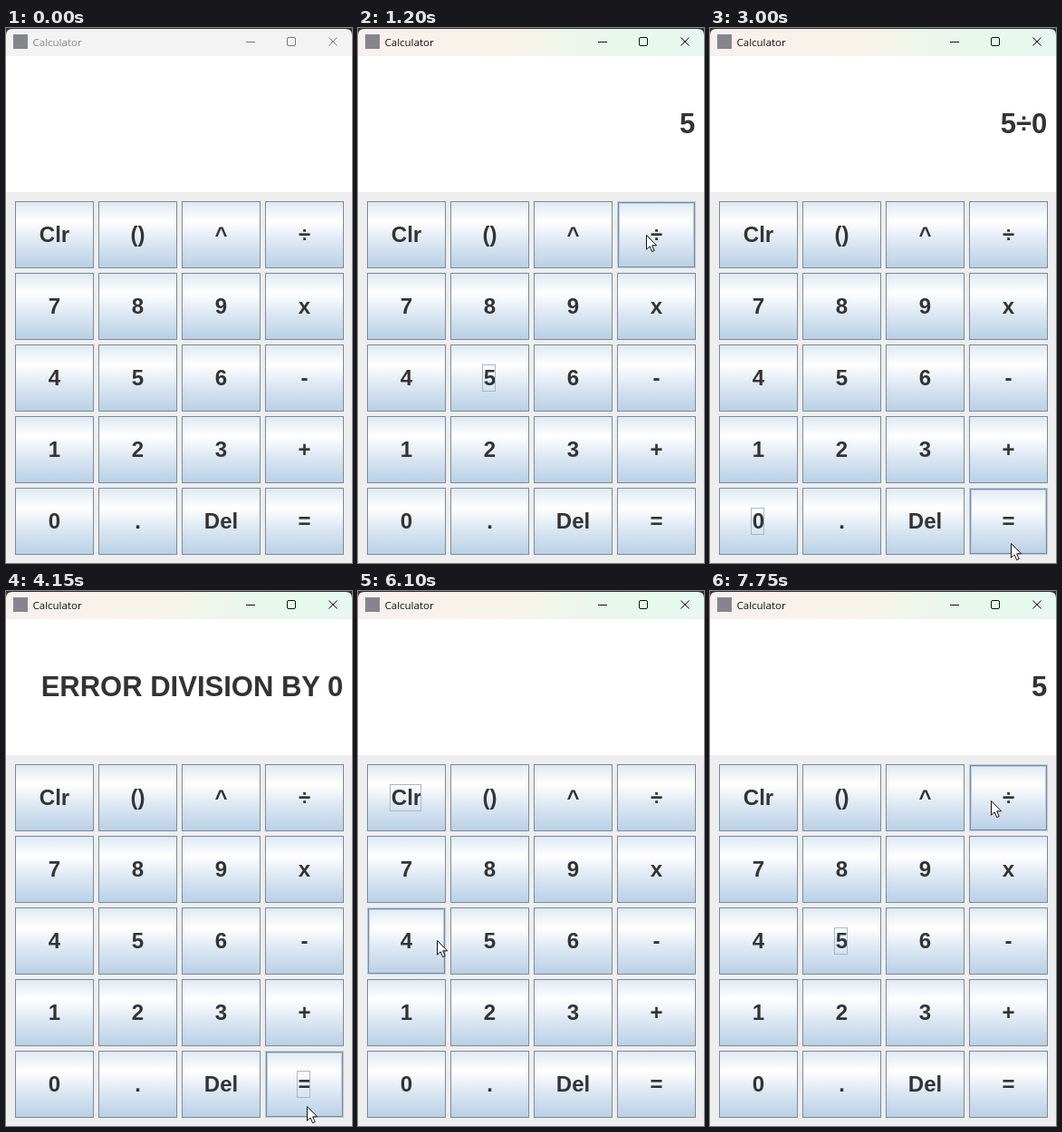
Animation of 382 by 590 pixels, one loop 8000 ms. Source, as an HTML page:

```html
<!DOCTYPE html>
<html lang="en">
<head>
<meta charset="utf-8">
<title>Calculator</title>
<style>
  html, body { margin: 0; width: 100%; height: 100%; overflow: hidden; background: #eee; }
  svg { display: block; }
  text { font-family: "Liberation Sans", Arial, sans-serif; font-weight: bold; fill: #333; }
  .key { font-size: 24px; text-anchor: middle; }
  #display { font-size: 31px; text-anchor: end; }
  #title { font: 11.5px "Open Sans", sans-serif; }
  .line { fill: none; stroke-width: 1; }
</style>
</head>
<body>
<svg id="stage" width="382" height="590" viewBox="0 0 382 590">
  <defs>
    <linearGradient id="face" x2="0" y2="1">
      <stop offset="0" stop-color="#dde8f3"/>
      <stop offset=".3" stop-color="#fff"/>
      <stop offset=".6" stop-color="#dde8f3"/>
      <stop offset="1" stop-color="#b8cfe5"/>
    </linearGradient>
    <linearGradient id="active">
      <stop offset="0" stop-color="#f8f0ee"/>
      <stop offset=".4" stop-color="#f9f2e8"/>
      <stop offset=".75" stop-color="#e8f8ec"/>
      <stop offset="1" stop-color="#e6f8f0"/>
    </linearGradient>
  </defs>
  <rect width="382" height="31" fill="#333"/>
  <path id="bar" d="M0 31V8Q0 1 7 1H375Q382 1 382 8V31Z"/>
  <rect x="8" y="7" width="16" height="16" fill="#85858f"/>
  <text id="title" x="29.5" y="20">Calculator</text>
  <g id="controls" class="line">
    <path d="M265 15.5h10"/>
    <rect x="310.5" y="10.5" width="9" height="9" rx="1.5"/>
    <path d="M356.5 10.5l9 9m0-9l-9 9"/>
  </g>
  <rect y="31" width="382" height="150" fill="#fff"/>
  <text id="display" x="372.3" y="116"></text>
  <g id="keys"></g>
  <path id="cursor" d="M.5 .5V16.2L4.1 12.8L6.6 18.6L9.2 17.5L6.7 11.8H11.6Z" fill="#fff" stroke="#111"/>
</svg>
<script>
const LOOP = 8000, HOLD = 100, W = 87, H = 74;
const $ = id => document.getElementById(id);

function add(parent, tag, attrs) {
  const el = document.createElementNS("http://www.w3.org/2000/svg", tag);
  for (const name in attrs) el.setAttribute(name, attrs[name]);
  parent.appendChild(el);
  return el;
}

const frame = (g, x, y, inset, color) => add(g, "rect", {
  x: x + inset + .5, y: y + inset + .5,
  width: W - 1 - 2 * inset, height: H - 1 - 2 * inset, class: "line", stroke: color
});

const keys = "Clr () ^ ÷ 7 8 9 x 4 5 6 - 1 2 3 + 0 . Del =".split(" ").map((label, i) => {
  const x = 10 + 92 * (i % 4), y = 191 + 79 * Math.floor(i / 4), mid = x + W / 2;
  const g = add($("keys"), "g", {});
  const face = add(g, "rect", { x, y, width: W, height: H });
  const edge = frame(g, x, y, 0, "#7a8a99");
  const glow = add(g, "g", {});
  frame(glow, x, y, 0, "#b8cfe5");
  frame(glow, x, y, 2, "#b8cfe5");
  frame(glow, x, y, 1, "#7a8a99");
  const sunk = add(g, "path", { d: `M${x} ${y + 1}h${W}M${x + 1} ${y}v${H}`, stroke: "#7a8a99", "stroke-width": 2 });
  add(g, "text", { x: mid, y: y + 45, class: "key" }).textContent = label;
  const w = { Clr: 34, "÷": 14, "=": 14 }[label] || 14;
  const focus = add(g, "rect", {
    x: Math.floor(mid - w / 2) - .5, y: y + 22.5, width: w, height: 29, class: "line", stroke: "#a3b8cc"
  });
  return { label, x, y, face, edge, glow, sunk, focus };
});

// press time, key, display after release
const presses = [
  [750, "5", "5"], [1250, "÷", "5÷"], [2200, "0", "5÷0"],
  [3400, "=", "ERROR DIVISION BY 0"], [5550, "Clr", ""], [7100, "5", "5"]
];

// pointer stops: time, x, y
const stops = [
  [50, 215, 600], [600, 167, 380], [900, 167, 380], [1180, 318, 228], [1380, 318, 228],
  [1700, 105, 462], [2080, 62, 546], [2720, 62, 546], [3000, 332, 568], [4350, 332, 568],
  [5050, 63, 228], [5680, 63, 228], [6370, 99, 465], [6850, 126, 391], [7230, 126, 391],
  [7730, 310, 231], [LOOP, 310, 231]
];

function pointer(t) {
  const i = stops.findIndex(s => s[0] > t);
  if (i < 1) return [215, 600];
  const [t0, x0, y0] = stops[i - 1], [t1, x1, y1] = stops[i];
  const u = (t - t0) / (t1 - t0), e = u * u * (3 - 2 * u);
  return [x0 + (x1 - x0) * e, y0 + (y1 - y0) * e];
}

const show = (el, on) => el.setAttribute("visibility", on ? "visible" : "hidden");

function draw(t) {
  const [px, py] = pointer(t).map(Math.round);
  let focused = "", held = "", shown = "";
  for (const [time, label, result] of presses) {
    if (t < time) break;
    focused = label;
    if (t < time + HOLD) held = label;
    else shown = result;
  }
  for (const k of keys) {
    const over = px >= k.x && px < k.x + W && py >= k.y && py < k.y + H;
    const down = k.label === held;
    k.face.setAttribute("fill", down ? "#b8cfe5" : "url(#face)");
    show(k.edge, down || !over);
    show(k.glow, over && !down);
    show(k.sunk, down);
    show(k.focus, k.label === focused);
  }
  const active = focused !== "";
  $("bar").setAttribute("fill", active ? "url(#active)" : "#f3f3f3");
  $("title").style.fill = active ? "#111" : "#888";
  $("controls").setAttribute("stroke", active ? "#111" : "#777");
  $("display").textContent = shown;
  $("cursor").setAttribute("transform", `translate(${px} ${py})`);
}

const start = performance.now();
function tick(now) {
  draw(Math.max(0, now - start) % LOOP);
  requestAnimationFrame(tick);
}
draw(0);
requestAnimationFrame(tick);
</script>
</body>
</html>
```
